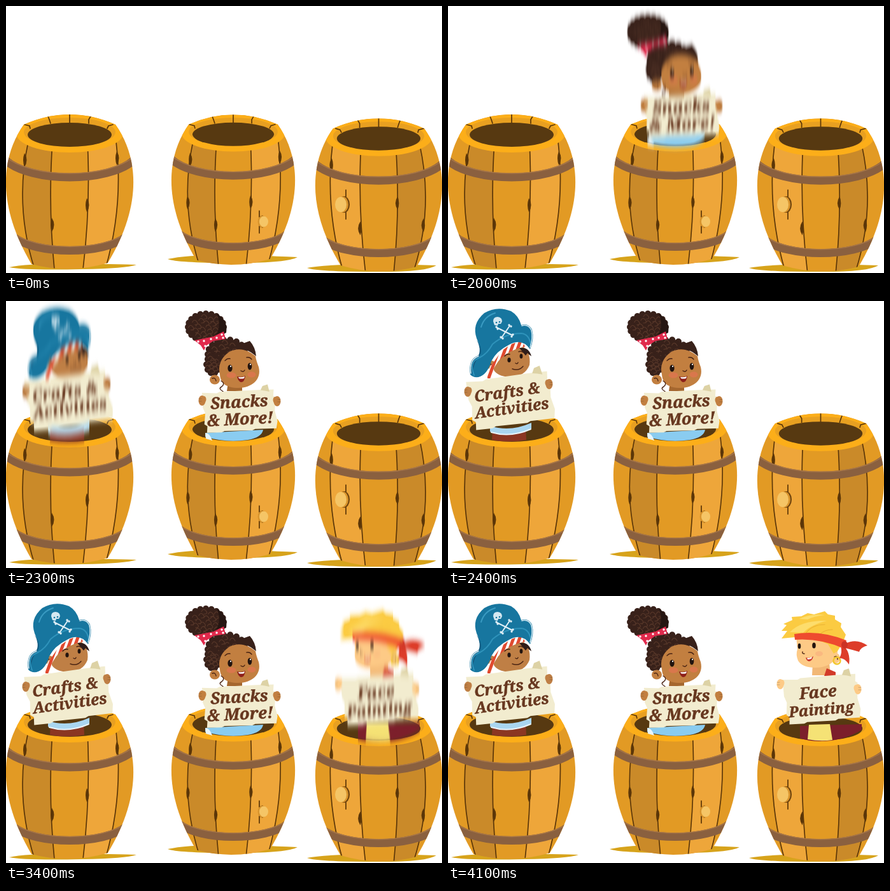
An HTML page that plays this animation: 685 px wide and 421 px high, repeating every 4500 ms.

```html
<!DOCTYPE html>
<html lang="en">
<head>
<meta charset="utf-8">
<title>Barrels</title>
<style>
  html, body { margin: 0; width: 100%; height: 100%; overflow: hidden; background: #fff; }
  svg { display: block; width: 685px; height: 421px; }
  text {
    font: italic bold 25px "Noto Serif", serif; text-anchor: middle;
    fill: #67371f; stroke: #67371f; stroke-width: .5px;
  }
  .line { fill: none; stroke: #5b3608; stroke-width: 1.7; stroke-linecap: round; }
  .ink { fill: none; stroke: #4a2413; stroke-width: 1.4; stroke-linecap: round; }
</style>
</head>
<body>
<svg viewBox="0 0 685 421">
  <defs>
    <clipPath id="hull">
      <path d="M-72 187C-106 235-117 310-60 407Q0 423 60 405C117 310 106 235 72 187Q0 155-72 187z"/>
    </clipPath>
    <filter id="rush" x="-10%" y="-15%" width="120%" height="130%" color-interpolation-filters="sRGB">
      <feGaussianBlur stdDeviation="0.6 6"/>
      <feComponentTransfer><feFuncA type="linear" slope="1.3"/></feComponentTransfer>
    </filter>
    <pattern id="stripes" width="9" height="9" patternUnits="userSpaceOnUse" patternTransform="rotate(20)">
      <path d="M0 0h9v9h-9z" fill="#fff"/><path d="M0 0h5v9h-5z" fill="#e04a2f"/>
    </pattern>
  </defs>
  <g id="stage"></g>
</svg>
<script>
const ellipse = (x, y, rx, ry, fill) =>
  `<ellipse cx="${x}" cy="${y}" rx="${rx}" ry="${ry}" fill="${fill}"/>`;
const shape = (d, fill) => `<path d="${d}" fill="${fill}"/>`;
const stroke = (d, color, width) =>
  `<path d="${d}" fill="none" stroke="${color}" stroke-width="${width}" stroke-linecap="round"/>`;
const line = d => `<path class="line" d="${d}"/>`;
const ink = d => `<path class="ink" d="${d}"/>`;

// Stave seams: x at the top, curve control and bottom
const seams = [[-65, -87, -55], [-27, -34, -24], [28, 33, 21], [73, 85, 56]];
const seam = ([top, mid, end]) => `M${top} 214Q${mid} 315 ${end} 415`;
const stave = (a, b, fill) =>
  shape(`${seam(a)}L${b[2]} 415Q${b[1]} 315 ${b[0]} 214z`, fill);
const hoop = (x, y, sag) => {
  const arc = top => `M${-x} ${top}C${-x * .6} ${top + sag} ${x * .6} ${top + sag} ${x} ${top}`;
  return stroke(arc(y), "#8a603f", 13) + stroke(arc(y - 6), "#a87647", 1.5);
};

function barrel(x, y, sx, sy, knots) {
  return `<g transform="translate(${x} ${y}) scale(${sx} ${sy})"><g clip-path="url(#hull)">
    ${shape("M-110 160h220v270h-220z", "#e29a24")}
    ${stave(seams[0], seams[1], "#ca8a29")}${stave(seams[2], seams[3], "#eea63a")}
    ${seams.map(s => line(seam(s))).join("")}
    ${knots.map(([kx, ky]) => shape(`M${kx} ${ky - 11}q7 11 0 22q-4-11 0-22z`, "#5b3608")).join("")}
    ${hoop(101, 243, 36)}${hoop(90, 363, 30)}
    ${ellipse(0, 201, 84, 30, "#fcae19")}${ellipse(0, 199, 72, 23, "#e8a021")}
    ${line("M-71 187l8 2 1 4M-34 174l2 5 2 6M0 170v14M33 174l-3 5v6M68 187l-7 2-2 4")}
    ${ellipse(0, 203, 66, 19, "#573911")}
  </g></g>`;
}

function curls(cx, cy, rx, ry, count) {
  let tufts = "", marks = "";
  for (let i = 0; i < count; i++) {
    const a = i * 2 * Math.PI / count, g = i * 2.4, r = Math.sqrt((i + .5) / count) * .9;
    tufts += ellipse(cx + rx * Math.cos(a), cy + ry * Math.sin(a), 5, 5, "#38211a");
    marks += `M${cx + rx * r * Math.cos(g) - 4} ${cy + ry * r * Math.sin(g)}q3-6 7-1t-3 5`;
  }
  return ellipse(cx, cy, rx + 1, ry + 1, "#38211a") + tufts + stroke(marks, "#573729", 1.2);
}

function sign(x, y, w, h, turn, skin, hands, lines) {
  const paper = "M-50-49L-30-46-26-49 25-49 48-48 47-32 50-28 48 5 51 30 49 48 20 47 16 50-22 48-26 51-46 50-45 34-49 29-47 2-50-12z";
  return `<g transform="translate(${x} ${y}) rotate(${turn})">
    <g transform="scale(${w / 100} ${h / 100})">
      ${shape(paper, "#f2eccf")}
      ${shape("M30-48L33-58 40-61 42-43 36-46z", "#ddd2a5")}
    </g>
    ${lines.map(([words, tx, ty, size]) =>
      `<text x="${tx}" y="${ty}" style="font-size:${size}px">${words}</text>`).join("")}
  </g>` + hands.map(([hx, hy], i) =>
    ellipse(hx, hy, 5.5, 8, skin) +
    ellipse(hx + (i ? -3 : 3), hy - 2, 3.5, 5, skin) +
    stroke(`M${hx + (i ? 1 : -1)} ${hy - 3}q${i ? 3 : -3} 1 ${i ? 4 : -4} 0m0 4h${i ? -4 : 4}`, "#0003", 1)).join("");
}

const girl = () => {
  const skin = "#c27f40";
  return shape("M313 208L404 203Q402 215 380 219Q345 224 313 214z", "#8accf0") +
    shape("M313 208q7 0 11 12l-10-3z", "#e9f5fb") +
    shape("M349 128h22v14h-24z", "#a5672f") +
    curls(314, 41, 28, 21, 20) + shape("M331 20Q349 31 346 50L328 56Q340 40 331 20z", "#261612") +
    curls(347, 84, 30, 23, 18) + curls(325, 100, 10, 14, 10) +
    shape("M336 116Q331 94 351 80Q372 70 392 87Q393 94 397 104C402 124 386 137 365 137C345 137 337 129 336 116z", skin) +
    ellipse(328, 124, 8, 7.5, skin) + ink("M324 122q5-2 6 4") +
    shape("M331 112q3-30 22-35q17-9 40 10q-1-14-10-24l-47 17z", "#38211a") +
    ink("M338 126q7 4 1 9q-6 3 1 7q4 3 1 4") +
    shape("M296 62L326 56 342 48 345 60 326 63 315 70 311 78 306 70z", "#e02a4c") +
    [[302, 64], [311, 63], [313, 71], [322, 60], [331, 58], [339, 53], [341, 58]]
      .map(([x, y]) => ellipse(x, y, 1.7, 1.7, "#fff")).join("") +
    ellipse(354, 117, 7.5, 4.5, "#d9774c") + ellipse(386, 116, 6.5, 4.5, "#d9774c") +
    ellipse(352, 106, 3.6, 5.6, "#21130e") + ellipse(383, 103, 3.3, 5.6, "#21130e") +
    ellipse(353, 103, 1, 1.3, "#fff") + ellipse(384, 100, 1, 1.3, "#fff") +
    ink("M344 94q4-4 8-3M378 89q5-1 8 3M369 110q4 3 6-1") +
    shape("M363 119Q370 121 376 118Q375 128 369 128Q365 127 363 119z", "#8d1f1a") +
    shape("M365 120q5 1 10-1l-1 3q-5 1-8 0z", "#fff") +
    sign(367, 173, 115, 64, -3, skin, [[308, 157], [426, 158]],
      [["Snacks", 0, -5, 25.5], ["&amp; More!", 0, 22, 25.5]]);
};

const pirate = () => {
  const skin = "#bf7f45";
  return shape("M70 202L122 200 123 219Q96 224 69 219z", "#8b3622") +
    shape("M66 197Q98 207 131 192V201Q98 217 66 206z", "#a9d6f0") +
    stroke("M68 207Q98 216 130 202", "#eaf5fb", 2) +
    shape("M71 107Q76 80 115 70Q131 80 128 101Q121 119 98 120Q76 119 71 107z", skin) +
    shape("M112 74q15-2 19 13q-5-3-6-5l-3 4z", "#2f1d19") +
    ellipse(68, 101, 7, 7, skin) + ink("M64 100q5-2 6 4") +
    shape("M62 122Q60 109 72 96L84 79Q102 64 117 63L121 72Q95 77 79 95L72 106 70 122z", "url(#stripes)") +
    shape("M35 116Q31 91 48 86Q53 76 45 59Q37 36 57 19Q77 7 99 16Q111 23 115 38Q126 34 132 45Q136 60 129 76Q116 58 96 69Q76 79 68 95Q62 116 48 120Q39 121 35 116z", "#17769f") +
    shape("M45 61Q57 79 48 88Q41 96 38 116Q32 91 48 86Q53 76 45 61z", "#125a80") +
    stroke("M41 117Q32 95 50 89Q62 83 70 68Q90 51 115 51Q128 52 130 70", "#2f93bb", 2) +
    stroke("M36 114Q33 92 48 87M116 39Q126 36 131 46Q134 58 129 73", "#d8ecf4", 1.5) +
    stroke("M52 41Q57 24 74 19", "#3a9bc2", 2) +
    stroke("M77 42L101 54M97 39L84 58", "#e0eff6", 2) +
    [[76, 41], [78, 44], [102, 53], [100, 56], [96, 38], [99, 40], [83, 57], [86, 59]]
      .map(([x, y]) => ellipse(x, y, 1.7, 1.7, "#e0eff6")).join("") +
    shape("M71 32q0-7 7-7q7 1 7 7l-2 4-4 0-1 3-5-1z", "#d5e8f1") +
    ellipse(76, 34, 1.3, 1.3, "#17769f") + ellipse(81, 33, 1.3, 1.3, "#17769f") +
    ellipse(96, 93, 2.6, 3.8, "#21130e") + ellipse(115, 87, 2.4, 3.8, "#21130e") +
    ink("M89 87q3-4 8-3M111 80q4-2 7 1M106 98q3 2 4-1M101 107q10 4 17-4") +
    sign(98.5, 156.5, 131, 78, -8, skin, [[31, 143], [159, 131]],
      [["Crafts &amp;", -4, -5, 24.5], ["Activities", 0, 21, 24.5]]);
};

const blond = () => {
  const skin = "#fdca86";
  return shape("M553 205L650 202 650 211Q620 229 585 229Q565 229 553 224z", "#7c1f2b") +
    shape("M567 203L600 202 604 227Q585 230 565 226z", "#f5e275") +
    shape("M573 105h26l2 20h-29z", "#f2b876") + shape("M595 114l14 6v6h-18z", "#d23a29") +
    shape("M547 64H612V94Q602 113 577 113Q557 113 550 102Q546 92 549 84z", skin) +
    shape("M524 67L533 55 524 55 532 46 527 44 541 38 540 33 555 32 565 27 575 29 592 24 597 29 608 31 608 37 618 43 617 49 625 61 621 72 612 87 606 91 597 76 570 65 545 65z", "#fbcb42") +
    shape("M537 57Q555 38 595 39Q569 46 558 58zM552 36q20-9 40-6q-18 2-27 7z", "#fddd6c") +
    stroke("M562 59q10-14 30-14M584 61q7-8 20-8", "#eab233", 1.2) +
    ellipse(609, 98, 7, 8, skin) + ink("M607 96q5-3 5 4") +
    `<circle cx="611" cy="102" r="5.5" fill="none" stroke="#f2c72c" stroke-width="2.4"/>` +
    shape("M624 75Q642 66 659 78Q648 81 646 88Q636 85 624 82zM620 77Q633 88 630 108Q623 97 615 98Q620 89 617 79z", "#dd3d2a") +
    shape("M544 60Q584 53 626 70L622 83Q584 66 545 69z", "#ee4b2f") +
    ellipse(623, 77, 5, 6, "#cc3325") +
    ellipse(552, 79, 2.3, 4.3, "#21130e") + ellipse(575, 78, 2.8, 4.6, "#21130e") +
    ink("M557 88q-1 3 3 3") + ellipse(583, 91, 6, 4, "#fab980") +
    shape("M562 97q7 2 12-2q-2 8-7 8q-4-1-5-6z", "#c7382d") +
    shape("M564 98q5 0 8-2l-1 3q-4 1-6 1z", "#fff") +
    sign(587, 162, 117, 72, -5, skin, [[522, 139], [644, 147]],
      [["Face", -5, -2, 25.5], ["Painting", -2, 25, 23.5]]);
};

const kids = [
  { id: "girl", start: 2000, art: girl },
  { id: "pirate", start: 2300, art: pirate },
  { id: "blond", start: 3400, art: blond }
];

document.getElementById("stage").innerHTML =
  shape("M5 412Q40 403 205 408Q188 414 120 415Q30 417 5 412z", "#d7a31b") +
  shape("M254 399Q300 388 458 396Q440 406 350 405Q270 405 254 399z", "#d7a31b") +
  shape("M473 413Q520 404 676 409Q660 420 575 419Q490 419 473 413z", "#d7a31b") +
  barrel(100, 0, 1, 1, [[-71, 243], [-28, 345], [27, 314], [74, 240]]) +
  barrel(357, 5, .97, .972, [[-70, 244], [-74, 314], [-29, 350], [28, 313], [75, 240]]) +
  barrel(585.5, 8, -.995, .99, [[74, 245], [29, 346], [-30, 306], [-71, 341]]) +
  line("M398 323v10M398 347v11M403 331q-6 1-6 9t6 9") +
  ellipse(403, 340, 7.5, 9.5, "#d9952e") + ellipse(405, 340, 7, 8.5, "#f5c566") +
  line("M534 290v12M534 324v12") +
  ellipse(531, 313, 9, 13, "#6b410d") + ellipse(529, 313, 9, 12.5, "#d9952e") +
  ellipse(526, 313, 9, 12, "#f5c566") +
  kids.map(kid => `<g id="${kid.id}">${kid.art()}</g>`).join("");

for (const kid of kids) kid.node = document.getElementById(kid.id);

function draw(now) {
  const t = now % 4500;
  for (const { node, start } of kids) {
    node.setAttribute("visibility", t < start ? "hidden" : "visible");
    node.setAttribute("filter", t < start + 100 ? "url(#rush)" : "none");
  }
}

const began = performance.now();
function tick() {
  draw(performance.now() - began);
  requestAnimationFrame(tick);
}
tick();
</script>
</body>
</html>
```
